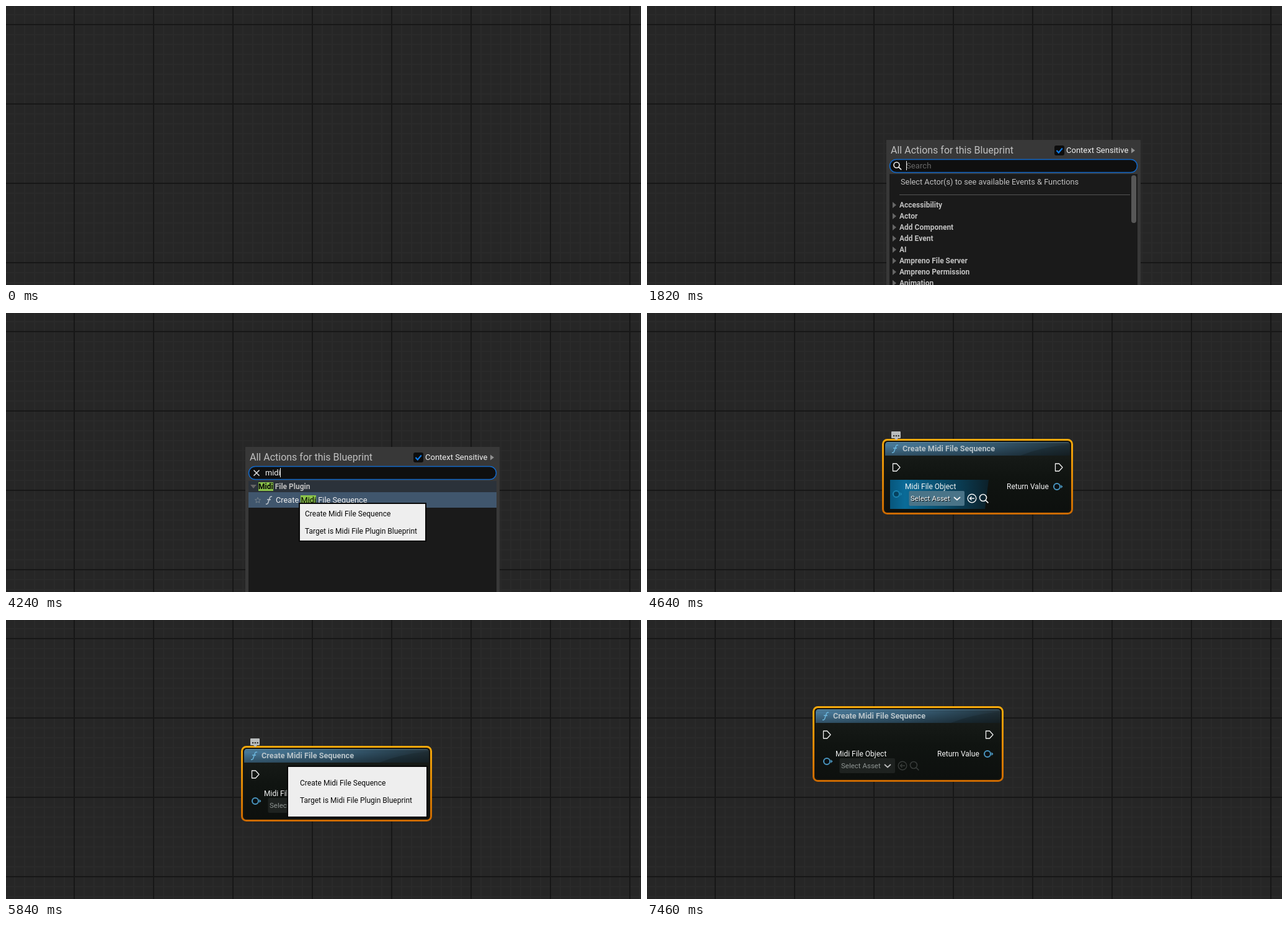
Write an HTML page that moves like this. It is 1024 by 450 pixels and loops after 7.86 s.

```html
<!DOCTYPE html>
<html lang="en">
<head>
<meta charset="utf-8">
<title>Add a node</title>
<style>
html, body { margin: 0; width: 100%; height: 100%; overflow: hidden; background: #262626; }
#stage { position: relative; width: 1024px; height: 450px; overflow: hidden; font: 12.8px/16px Roboto, sans-serif; color: #c0c0c0; }
.layer, svg { position: absolute; left: 0; top: 0; width: 1024px; height: 450px; }
.t { position: absolute; white-space: pre; }
.b { font-weight: 700; font-size: 12px; }
.s { font-size: 12px; }
mark { background: #8bc34a; color: #000; }
</style>
</head>
<body>
<div id="stage"></div>
<script>
const LOOP = 7860;
const stage = document.getElementById('stage');

function layer(shapes, texts = '', parent = stage) {
  const el = document.createElement('div');
  el.className = 'layer';
  el.innerHTML = `<svg viewBox="0 0 1024 450">${shapes}</svg>${texts}`;
  parent.append(el);
  return el;
}

// Text starts at x and is centred on y.
const text = (x, y, str, cls = '', css = '') =>
  `<div class="t ${cls}" style="left:${x}px;top:${y - 8}px;${css}">${str}</div>`;
const box = (x, y, w, h, fill, more = '') =>
  `<rect x="${x}" y="${y}" width="${w}" height="${h}" fill="${fill}" ${more}/>`;
const line = (d, stroke, width = 1.5, more = '') =>
  `<path d="${d}" fill="none" stroke="${stroke}" stroke-width="${width}" ${more}/>`;
const shape = (d, fill) => `<path d="${d}" fill="${fill}"/>`;
const right = (x, y) => shape(`M${x} ${y - 5}l6 5-6 5z`, '#666');
const down = (x, y) => shape(`M${x} ${y - 3}h10l-5 6z`, '#666');
const func = (x, y, color) =>
  line(`M${x - 5} ${y + 6}q3 1 4-3l2-6q1-4 4-2.6M${x - 3} ${y - 1}h6`, color, 1.4);
const lens = (x, y, r, color) =>
  line(`M${x - r} ${y}a${r} ${r} 0 1 1 ${2 * r} 0a${r} ${r} 0 1 1 ${-2 * r} 0M${x + r * .7} ${y + r * .7}l4.5 4.5`, color, 1.6);

// Each row is [time, value]; values hold until the next row.
function hold(el, prop, rows) {
  const frames = rows.map(([t, v]) => ({ offset: t / LOOP, [prop]: v, easing: 'steps(1, end)' }));
  frames.push({ offset: 1, [prop]: rows[rows.length - 1][1] });
  el.animate(frames, { duration: LOOP, iterations: Infinity });
}
// Times switch the element on and off in turn.
const show = (el, ...times) =>
  hold(el, 'opacity', [[0, 0], ...times.map((t, i) => [t, i % 2 ? 0 : 1])]);
const move = (el, rows) =>
  hold(el, 'transform', rows.map(([t, x, y]) => [t, `translate(${x}px, ${y}px)`]));

// Graph paper
function grid(step, color) {
  let d = '';
  for (let x = 110 % step; x < 1024; x += step) d += `M${x} 0V450`;
  for (let y = 30 % step; y < 450; y += step) d += `M0 ${y}H1024`;
  return line(d, color, 2);
}
layer(box(0, 0, 1024, 450, '#262626') + grid(16, '#2a2a2a') + grid(128, '#171717'));

// Node, drawn at its resting place
const WHITE = '#f2f2f2', PIN = '#4a97c2';
const exec = x => line(`M${x} 179h6l5.5 6-5.5 6h-6z`, WHITE, 1.3, 'stroke-linejoin="round"');
const pin = (x, y) =>
  `<circle cx="${x}" cy="${y}" r="5" fill="#0c1114" stroke="${PIN}" stroke-width="2"/>` +
  shape(`M${x + 6.5} ${y - 3}l3 3-3 3z`, PIN);
const buttons = color =>
  `<circle cx="412" cy="235" r="6.8" fill="none" stroke="${color}" stroke-width="1.4"/>` +
  line('M416 235h-7.5m3-3l-3 3 3 3', color, 1.4) + lens(430, 234, 5.5, color);
const fade = (id, dir, stops) =>
  `<linearGradient id="${id}" ${dir}>${stops.map(([o, c, a = 1]) =>
    `<stop offset="${o}" stop-color="${c}" stop-opacity="${a}"/>`).join('')}</linearGradient>`;
const VERT = 'x2="0" y2="1"';

const node = layer(
  fade('ring', VERT, [[0, '#f5a90c'], [1, '#cc6a00']]) +
  fade('body', VERT, [[0, '#1a1e1b'], [.5, '#101411'], [1, '#0d100e']]) +
  fade('head', '', [[0, '#4a7c9c'], [.45, '#3b647e'], [.85, '#273f4d'], [1, '#233138']]) +
  fade('shade', VERT, [[0, '#8fc4e0', .35], [.2, '#000', 0], [1, '#000', .35]]) +
  box(268.5, 140.5, 305, 119, '#15130d', 'rx="7" stroke="url(#ring)" stroke-width="3"') +
  box(272, 144, 298, 112, 'url(#body)', 'rx="5"') +
  shape('M272 166v-17q0-5 5-5h288q5 0 5 5v17z', 'url(#head)') +
  shape('M490 166q35-14 80-18v18z', '#1b282f66') +
  shape('M272 166v-17q0-5 5-5h288q5 0 5 5v17z', 'url(#shade)') +
  func(288, 155, '#6cb6dd') + exec(284.5) + exec(546.5) + pin(549, 216));

const idle = layer(
  box(310.5, 223, 89.5, 24, '#1e2220', 'rx="2"') + buttons('#383c3a') +
  line('M383 233l5 4.5 5-4.5', '#c0c0c0', 1.7) + pin(290, 228),
  text(313, 235, 'Select Asset', '', 'font-size:11.5px;color:#8f9593'), node);

const hover = layer(
  fade('glow', '', [[0, '#07567c'], [.15, '#0a6b98'], [.55, '#094b69'], [1, '#0c2029']]) +
  shape('M280 205H439l-6 47H280z', 'url(#glow)') +
  box(310.5, 223, 89.5, 24, '#4a7488', 'rx="2"') + buttons(WHITE) +
  line('M383 233l5 4.5 5-4.5', WHITE, 1.7) +
  '<circle cx="290" cy="228" r="5" fill="#06425f" stroke="#1b83af" stroke-width="2"/>' +
  shape('M296.500 225l3 3-3 3z', '#1b83af'),
  text(313, 235, 'Select Asset', '', 'font-size:11.5px;color:#fff;text-shadow:1px 1px #000'), node);

layer('',
  text(300, 155, 'Create Midi File Sequence', 'b', 'font-size:12.7px;color:#b8c4ca') +
  text(304, 216, 'Midi File Object', 's', 'color:#f4f4f4') +
  text(468, 216, 'Return Value', 's', 'color:#f4f4f4'), node);

const bubble = layer(
  shape('M283 127h13q1 0 1 1v9q0 1-1 1h-3l-3 3-3-3h-4q-1 0-1-1v-9q0-1 1-1z', '#b9bcbd') +
  [285, 288.8, 292.600].map(x => box(x, 133, 2.200, 2.200, '#333')).join(''), '', node);

show(node, 4640);
show(hover, 4640, 5240);
show(idle, 5240);
show(bubble, 4640, 6060, 6460, 7060);
move(node, [[0, 112, 64], [6060, 16, 16], [6260, 0, 0]]);

// Action menu
const menu = layer(
  box(386, 216, 410, 240, '#383838') +
  box(391, 271, 400, 180, '#1a1a1a') +
  box(657, 225, 16, 16, '#0d0d0d', 'rx="3"') +
  line('M660.500 233l3.300 3.500 6-7', '#0f7ae5', 2.200) +
  shape('M781 228.500l6 4.500-6 4.500z', '#909090') +
  box(391.500, 247.500, 399, 21, '#0f0f0f', 'rx="10.500" stroke="#1268c8" stroke-width="1.500"'),
  text(393, 232.5, 'All Actions for this Blueprint', '', 'font-size:16px') +
  text(676, 233, 'Context Sensitive', '', 'font-size:13px;color:#f0f0f0'));

const groups = ['Accessibility', 'Actor', 'Add Component', 'Add Event', 'AI',
  'Ampreno File Server', 'Ampreno Permission', 'Animation'];
const all = layer(
  lens(402.500, 256.500, 4.500, WHITE) +
  line('M407 304.500H779', '#555', 1) +
  box(781, 273, 8, 77, '#575757', 'rx="4"') +
  groups.map((_, i) => right(396, 321 + 18 * i)).join(''),
  text(418, 258, 'Search', '', 'font-size:13.2px;color:#686868') +
  text(409, 284, 'Select Actor(s) to see available Events &amp; Functions') +
  groups.map((g, i) => text(407, 321 + 18 * i, g, 'b')).join(''), menu);

const clear = line('M399.500 253.500l9 9m0-9l-9 9', '#d8d8d8', 1.7);
const pill = y => box(428, y - 4, 12, 8, '#fff', 'rx="3.500"');
const mid = layer(
  clear + box(391, 336, 388, 18, '#2b323a') + box(391, 354, 388, 25, '#40566d') +
  down(404, 284) + down(414, 302) + down(404, 345) + down(404, 388) +
  line('M448 318.500h-5v11h5M437 324h9', '#eee', 2) +
  shape('M447 317l5 3.500-5 3.500z', '#eee') +
  func(434, 367, '#aab3ba') + pill(410) + pill(435),
  text(418, 258, 'mid', '', 'color:#f0f0f0') +
  text(417, 284, 'Flow Control', 'b') +
  text(427, 302, 'Switch', 'b') +
  text(455, 324, 'Switch on E<mark>MID</mark>CreationFlags') +
  text(417, 345, 'String', 'b') +
  text(445, 367, '<mark>Mid</mark>') +
  text(417, 388, 'Struct', 'b') +
  text(445, 410, 'Break Generic Team Id', '', 'font-size:13px') +
  text(445, 435, 'Break <mark>Mid</mark>dle'), menu);

const midi = layer(
  clear + box(391, 271, 400, 18, '#2b323a') + box(391, 289, 400, 25, '#40566d') +
  down(394, 280) + func(424, 302, '#c3cad0'),
  text(418, 258, 'midi', '', 'color:#f0f0f0') +
  text(407, 280, '<mark>Midi</mark> File Plugin', 'b') +
  text(435, 302, 'Create <mark>Midi</mark> File Sequence', '', 'color:#f0f0f0'), menu);

const star = layer(line(
  'M406 297.500l1.300 3 3.200.3-2.400 2.100.8 3.200-2.900-1.700-2.900 1.700.8-3.200-2.400-2.100 3.200-.3z', '#74808b', 1), '', midi);
const caret = layer(box(0, 250, 1, 15, '#f0f0f0'), '', menu);

show(menu, 820, 4640);
show(all, 820, 3040);
show(mid, 3040, 3240);
show(midi, 3240, 4640);
show(star, 4040, 4640);
show(caret, 1820, 2420, 3040, 4640);
move(caret, [[0, 418, 0], [3040, 439, 0], [3240, 442, 0]]);

// Tooltips
function tip(x, y, w, h, rows) {
  return layer(
    box(x + 1, y + 1, w - 2, h - 2, '#eee', 'stroke="#080808" stroke-width="2"'),
    rows.map(([tx, ty, s]) => text(tx, ty, s, 's', 'color:#080808')).join(''));
}
const NAME = 'Create Midi File Sequence', TARGET = 'Target is Midi File Plugin Blueprint';
const menuTip = tip(472, 306, 206, 63, [[482, 324, NAME], [482, 352, TARGET]]);
const pinTip = tip(460, 295, 197, 50,
  [[471, 313, 'Midi File Object'], [471, 327, 'Midi File Object Object Reference']]);
const headTip = tip(453, 235, 227, 84, [[474, 263, NAME], [474, 291, TARGET]]);
show(menuTip, 4240, 4640);
show(pinTip, 4840, 5240);
show(headTip, 5840, 6060);
move(pinTip, [[0, 14, 11], [5040, 0, 0]]);

// Pointer
const pointer = layer(
  '<path d="M0 0V16.200L3.600 12.800 6 18.200 8.700 17 6.300 11.700H11.200Z" fill="#fff" stroke="#111" stroke-width=".9"/>');
move(pointer, [
  [0, 386.5, 216.5], [1420, 372, 214], [1620, 340, 210], [1820, 317.5, 208.5],
  [3840, 356, 238], [4040, 450, 292], [4240, 459.5, 298], [4640, 459, 296],
  [4840, 457.5, 293], [5040, 443.5, 282], [5240, 440, 258], [5460, 438, 234],
  [5640, 437.5, 227], [6060, 341, 178], [6260, 326, 164], [6860, 365, 218],
  [7060, 600, 310], [7260, 892, 432]
]);
show(pointer, 0, 7460);
</script>
</body>
</html>
```
